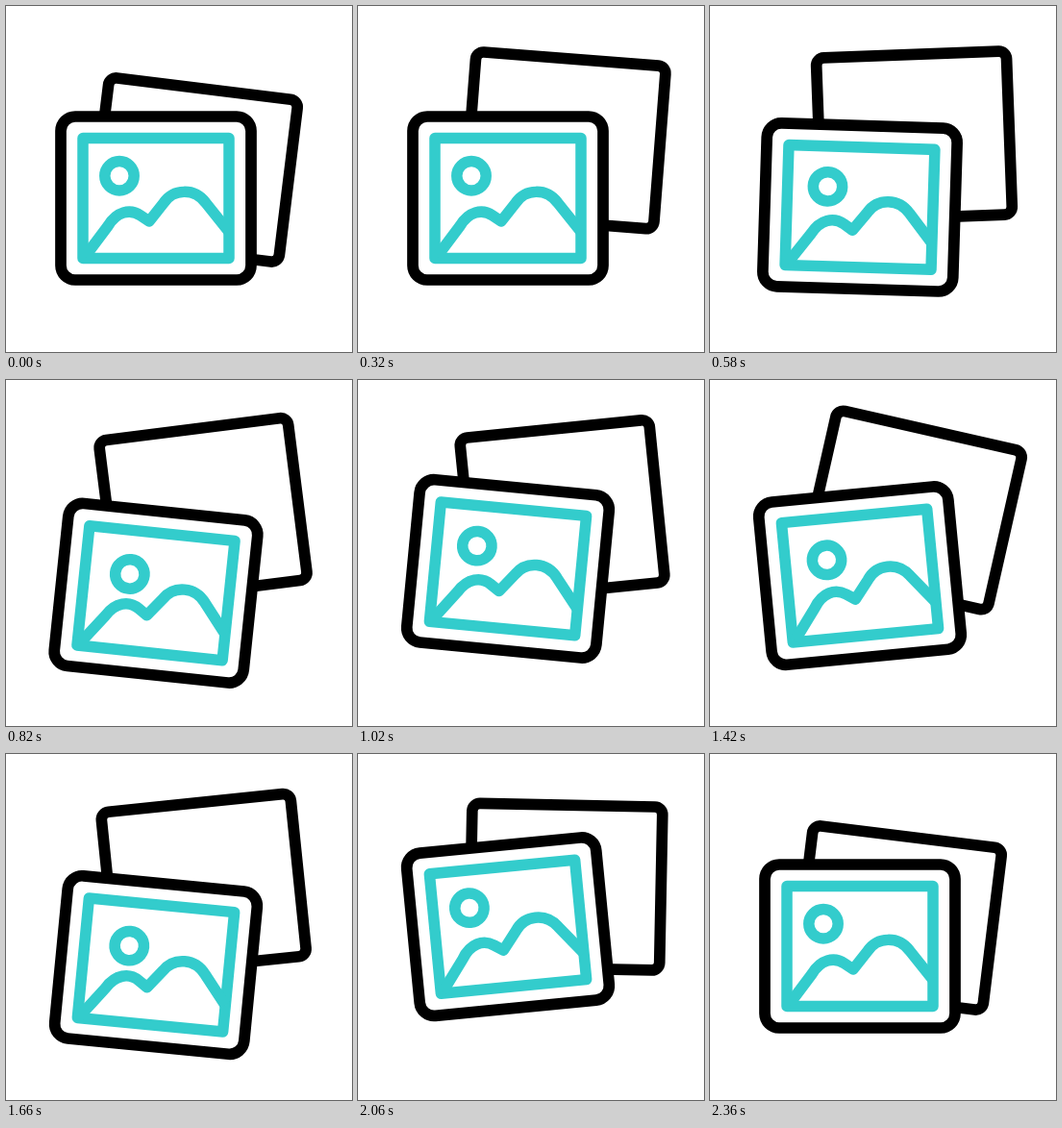
An HTML page with a canvas for the animation above (2.4 s loop, 360x360 px).

```html
<!DOCTYPE html>
<html lang="en">
<head>
<meta charset="utf-8">
<title>Pictures</title>
<style>
  html, body { margin: 0; width: 100%; height: 100%; overflow: hidden; background: #fff; }
  canvas { display: block; width: 360px; height: 360px; }
</style>
</head>
<body>
<canvas id="stage" width="360" height="360"></canvas>
<script>
const ctx = document.getElementById("stage").getContext("2d");
const LOOP = 2400;
const BEAT = 400; // time from one end of a swing to the other
const END = 2360;

const clamp = (v, low, high) => Math.min(high, Math.max(low, v));

// Eased 0 to 1 between two times.
function ramp(t, from, to) {
  const p = clamp((t - from) / (to - from), 0, 1);
  return p * p * (3 - 2 * p);
}

// Rises to 1, stays, falls back to 0.
const hold = (t, start, first, last, end) => ramp(t, start, first) * (1 - ramp(t, last, end));

// Rises from 0 to 1, swings between 1 and -1 for some beats, settles at 0.
function swing(t, start, first, beats, end) {
  const last = first + beats * BEAT;
  const phase = (clamp(t, first, last) - first) / BEAT;
  return Math.cos(Math.PI * phase) * hold(t, start, first, last, end);
}

function place(x, y, degrees, draw) {
  ctx.save();
  ctx.translate(x, y);
  ctx.rotate(degrees * Math.PI / 180);
  draw();
  ctx.restore();
}

function card(radius) {
  ctx.beginPath();
  ctx.roundRect(-99, -85, 198, 170, radius);
  ctx.fillStyle = "#fff";
  ctx.fill();
  ctx.strokeStyle = "#000";
  ctx.lineWidth = 11.7;
  ctx.stroke();
}

function picture(sunShift) {
  ctx.strokeStyle = "#33cccc";
  ctx.lineWidth = 11.5;
  ctx.lineJoin = "round";
  ctx.strokeRect(-76, -62.5, 152, 125);

  ctx.beginPath();
  ctx.moveTo(-74, 61);
  ctx.lineTo(-50, 29);
  ctx.bezierCurveTo(-41, 14, -27, 10.5, -16, 18);
  ctx.lineTo(-7, 24);
  ctx.lineTo(8, 5);
  ctx.bezierCurveTo(18, -10, 40, -11, 52, 5);
  ctx.lineTo(76, 35);
  ctx.stroke();

  ctx.beginPath();
  ctx.arc(-38 + 9 * sunShift, -23.3 + 6.5 * sunShift, 15.2, 0, Math.PI * 2);
  ctx.stroke();
}

function drawBack(t) {
  const lift = hold(t, 40, 400, 2000, END);
  const x = 195.5 + 16 * lift + 6.5 * swing(t, 40, 400, 4, END);
  const y = 170.5 - 35 * lift;
  const turn = 7 - 3.5 * hold(t, 100, 940, 1740, 2300) - 11.5 * swing(t, 100, 940, 2, 2300);
  place(x, y, turn, () => card(8));
}

function drawFront(t) {
  const y = 200 + 22 * swing(t, 400, 800, 3, END);
  const turn = 6.8 * swing(t, 400, 940, 3, END);
  const sunPhase = clamp(t, 400, 2000) / BEAT - 1;
  const sunShift = (1 - Math.cos(Math.PI * sunPhase)) / 2;
  place(156, y, turn, () => {
    card(15);
    picture(sunShift);
  });
}

const start = performance.now();
function tick() {
  const t = (performance.now() - start) % LOOP;
  ctx.fillStyle = "#fff";
  ctx.fillRect(0, 0, 360, 360);
  drawBack(t);
  drawFront(t);
  requestAnimationFrame(tick);
}
tick();
</script>
</body>
</html>
```
